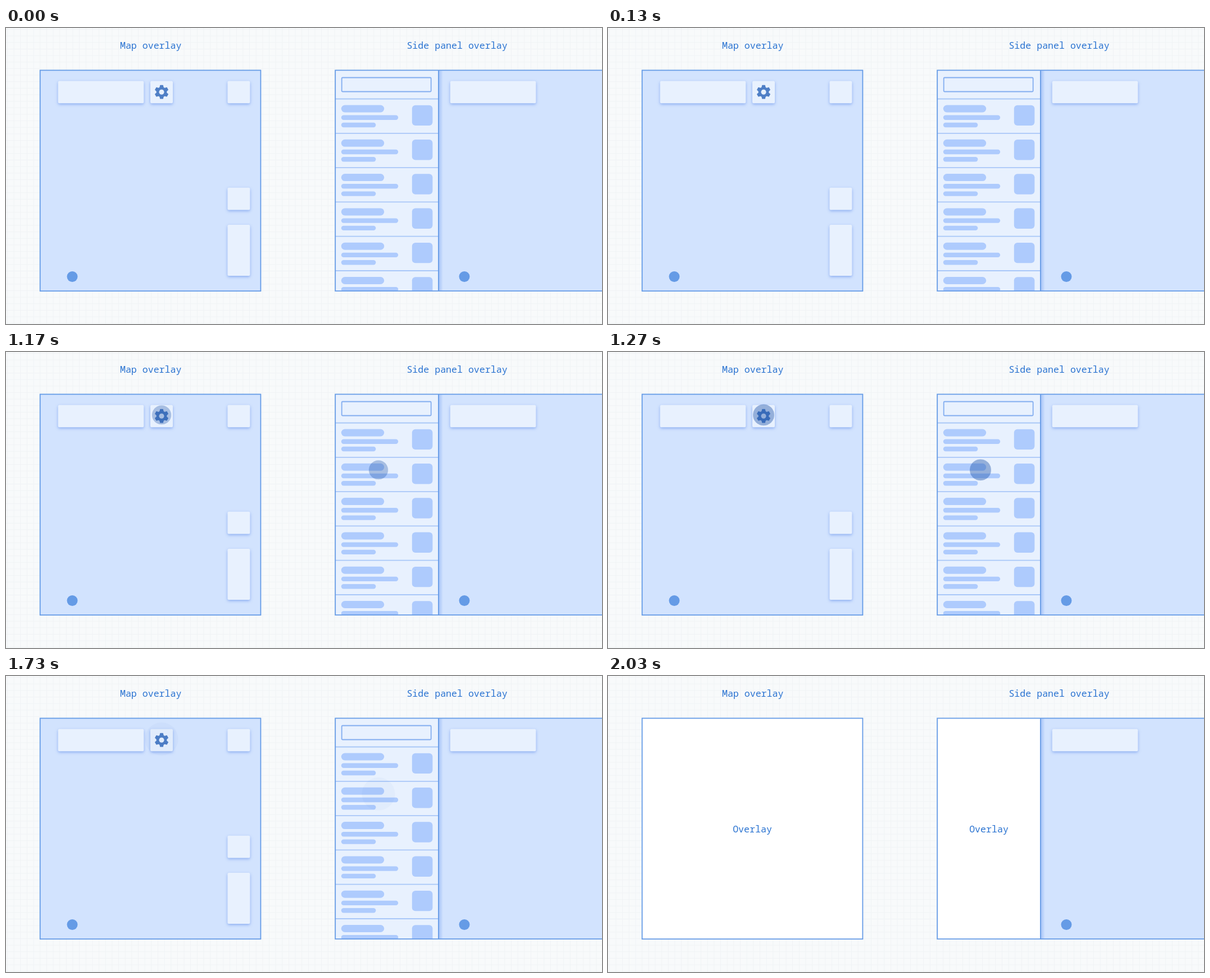
An HTML page for the animation above (3730 ms loop, 1061 by 528 pixels).

```html
<!DOCTYPE html>
<html lang="en">
<head>
<meta charset="utf-8">
<title>Map overlays</title>
<style>
  html, body { margin: 0; width: 100%; height: 100%; overflow: hidden; background: #f8fafb; }
  svg { display: block; width: 1061px; height: 528px; }
  text { font: 16.6px "Noto Sans Mono", "DejaVu Sans Mono", monospace; fill: #2a73d1; text-anchor: middle; }
  .frame { fill: none; stroke: #659be6; stroke-width: 1.8; }
  .map { fill: #d2e3fe; }
  .panel, .tile { fill: #e8f1fe; }
  .tiles { filter: drop-shadow(0 2px 2.5px rgba(70, 120, 230, .5)); }
  .bar { fill: #aecbfd; }
  .rule { stroke: #a9c7f8; stroke-width: 1.8; }
  .search { fill: none; stroke: #83adf0; stroke-width: 1.8; }
  .gear { fill: #4f7fc6; }
  .badge { fill: #659be6; }
  .white { fill: #fff; }
  .tap { fill: #174ea6; transform-box: fill-box; transform-origin: center; opacity: 0; }
</style>
</head>
<body>
<svg id="stage" viewBox="0 0 1061 528">
  <defs>
    <pattern id="grid" x="2" y="2" width="11.65" height="11.65" patternUnits="userSpaceOnUse">
      <path d="M.5 0V11.65M0 .5H11.65" stroke="#f0f3f5" fill="none"/>
    </pattern>
    <linearGradient id="edge">
      <stop stop-color="#7ba4f0" stop-opacity=".55"/>
      <stop offset="1" stop-color="#7ba4f0" stop-opacity="0"/>
    </linearGradient>
    <clipPath id="panelClip"><rect x="586" y="75" width="184" height="394"/></clipPath>
  </defs>

  <rect width="1061" height="528" fill="url(#grid)"/>
  <text x="257.7" y="36.5">Map overlay</text>
  <text x="803" y="36.5">Side panel overlay</text>

  <rect class="map" x="61" y="75.5" width="392.5" height="393.5"/>
  <g class="tiles" id="mapTiles"></g>
  <g class="gear" id="gear" transform="translate(277 114.2)"></g>
  <circle class="badge" cx="118" cy="443.5" r="9.5"/>

  <rect class="map" x="770" y="75.5" width="300" height="393.5"/>
  <rect x="770" y="76" width="8" height="393" fill="url(#edge)"/>
  <g class="tiles" id="sideTiles"></g>
  <circle class="badge" cx="816" cy="443.5" r="9.5"/>

  <rect class="panel" x="586" y="75.5" width="184" height="393.5"/>
  <rect class="search" x="597.7" y="88.5" width="159" height="25" rx="1.5"/>
  <g id="rows" clip-path="url(#panelClip)"></g>

  <circle class="tap" cx="277" cy="112.3" r="19"/>
  <circle class="tap" cx="663" cy="210.3" r="19"/>

  <g id="overlay" opacity="0">
    <rect class="white" x="61" y="75.5" width="392.5" height="393.5"/>
    <rect class="white" x="586" y="75.5" width="184" height="393.5"/>
    <text x="257" y="279">Overlay</text>
    <text x="678" y="279">Overlay</text>
  </g>

  <rect class="frame" x="60.7" y="75.4" width="392.7" height="393.8"/>
  <path class="frame" d="M1062 75.4H586.2V469.2H1062M770 75.4V469.2"/>
</svg>
<script>
const LOOP = 3730;
const $ = id => document.getElementById(id);

function add(parent, tag, attrs) {
  const el = document.createElementNS("http://www.w3.org/2000/svg", tag);
  for (const key in attrs) el.setAttribute(key, attrs[key]);
  return parent.appendChild(el);
}

function box(parent, cls, x, y, width, height, rx) {
  add(parent, "rect", { class: cls, x, y, width, height, rx });
}

const tile = (parent, x, y, w, h) => box(parent, "tile", x, y, w, h, 2.5);
tile($("mapTiles"), 92.7, 94.4, 152.6, 39.8);
tile($("mapTiles"), 257, 94.4, 40, 39.8);
tile($("mapTiles"), 394.4, 94.4, 40, 39.8);
tile($("mapTiles"), 394.4, 284.8, 40, 39.8);
tile($("mapTiles"), 394.4, 351, 40, 91);
tile($("sideTiles"), 790.8, 94.4, 152.6, 39.8);

add($("gear"), "circle", { r: 9.3 });
for (let a = 0; a < 360; a += 60) {
  add($("gear"), "path", {
    d: "M-3.7 -8L-2.9 -11.8Q-2.8 -12.4 -2.2 -12.4H2.2Q2.8 -12.4 2.9 -11.8L3.7 -8Z",
    transform: `rotate(${a})`
  });
}
add($("gear"), "circle", { class: "tile", r: 4.5 });

for (let i = 0; i < 6; i++) {
  const y = 126.5 + i * 61.3, rows = $("rows");
  add(rows, "path", { class: "rule", d: `M586 ${y}H770` });
  box(rows, "bar", 596.8, y + 11, 76.4, 13, 6.5);
  box(rows, "bar", 596.8, y + 29, 101.4, 8.4, 4.2);
  box(rows, "bar", 596.8, y + 42.3, 61.6, 8.4, 4.2);
  box(rows, "bar", 722.8, y + 11.2, 36.6, 36.4, 6);
}

// Each step: time in ms, scale, opacity.
const TAP = [
  [0, .45, 0], [940, .45, 0], [970, .5, .03], [1070, .72, .17],
  [1170, .9, .31], [1270, 1, .4], [1470, 1.04, .43], [1500, 1.04, .43],
  [1600, 1.28, .24], [1730, 1.55, .03], [1900, 1.55, .03],
  [1900, 1.55, 0], [LOOP, .45, 0]
];
const timing = { duration: LOOP, iterations: Infinity };
const taps = TAP.map(([t, scale, opacity]) =>
  ({ offset: t / LOOP, transform: `scale(${scale})`, opacity }));
const cut = 1900 / LOOP;
const players = [...document.querySelectorAll(".tap")].map(el => el.animate(taps, timing));
players.push($("overlay").animate([
  { offset: 0, opacity: 0 }, { offset: cut, opacity: 0 },
  { offset: cut, opacity: 1 }, { offset: 1, opacity: 1 }
], timing));
players.forEach(p => p.startTime = document.timeline.currentTime);
</script>
</body>
</html>
```
